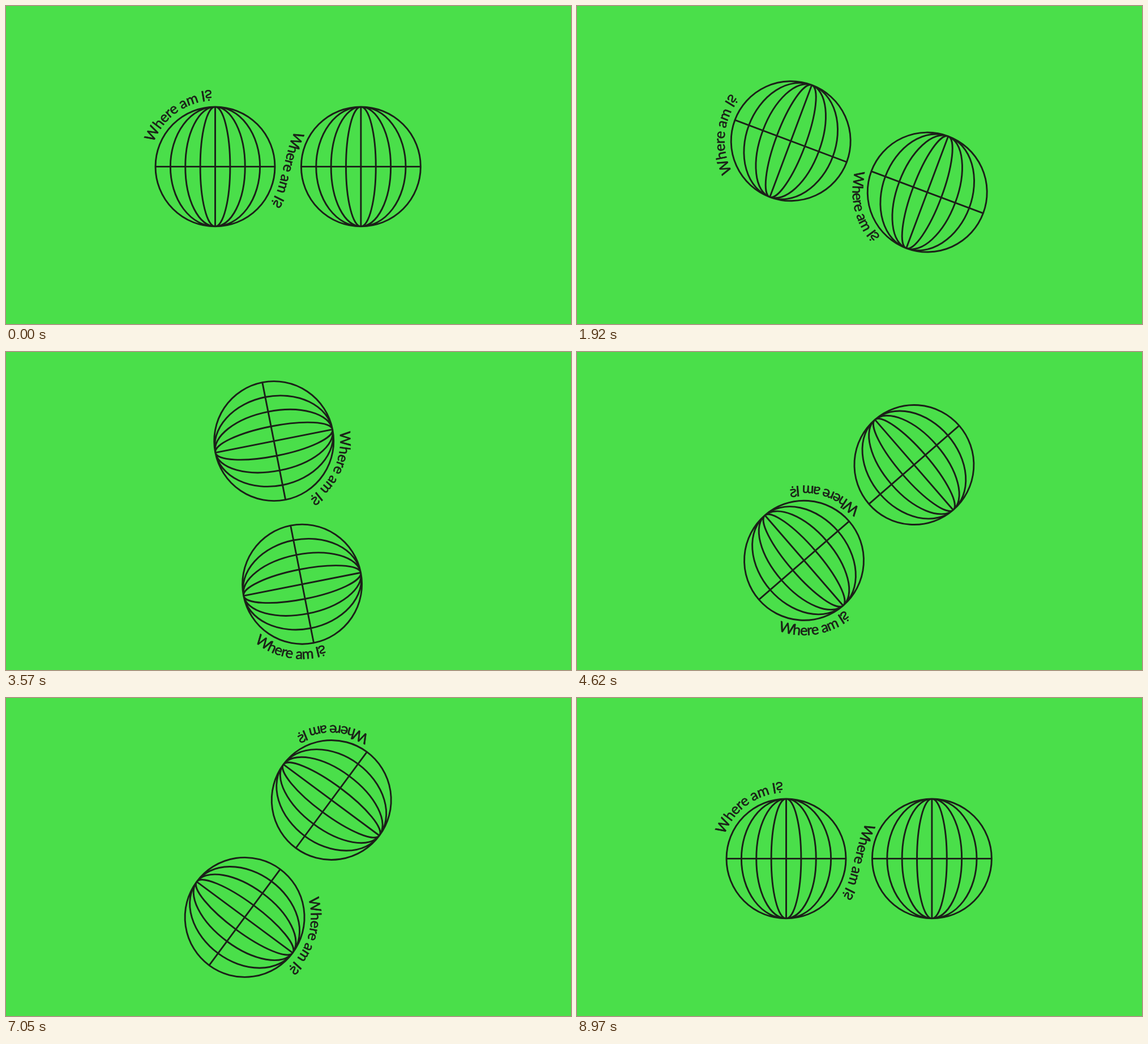
An HTML page with a canvas that plays this animation: 998 px wide and 561 px high, repeating every 9000 ms.

```html
<!DOCTYPE html>
<html lang="en">
<head>
<meta charset="utf-8">
<title>Where am I?</title>
<style>
  html, body { margin: 0; width: 100%; height: 100%; overflow: hidden; background: #4adf4a; }
  canvas { display: block; width: 998px; height: 561px; }
</style>
</head>
<body>
<canvas id="stage" width="998" height="561"></canvas>
<script>
const ctx = document.getElementById('stage').getContext('2d');
const GREEN = '#4adf4a', INK = '#1b2018';
const LOOP = 9000, STEP = 30, LAST = LOOP / STEP - 1;
const CENTER = { x: 498.2, y: 283.4 };
const D = 128.7;   // hub to globe centre
const R = 105.5;   // globe radius
const TEXT = 'Where am I?';
const FONT = '25.5px Lato, "Open Sans", sans-serif';
const TRACK = -0.6;
const STARTS = [5.3, 482.7];

// Figure-eight baseline: two arcs joined by crossing inner tangents.
const RL = 117, RR = 132;
const PHI = Math.acos((RL + RR) / (2 * D));
const TL = RL * Math.tan(PHI), TR = RR * Math.tan(PHI);
const SWEEP = 2 * (Math.PI - PHI);
const LEFT_END = TL + RL * SWEEP;
const RIGHT_START = LEFT_END + TL + TR;
const RIGHT_END = RIGHT_START + RR * SWEEP;
const TOTAL = RIGHT_END + TR;

function onLeft(a) {
  return { x: -D + RL * Math.cos(a), y: RL * Math.sin(a), dir: a + Math.PI / 2 };
}

function onRight(a) {
  return { x: D + RR * Math.cos(a), y: RR * Math.sin(a), dir: a - Math.PI / 2 };
}

function along(p, dist) {
  return { x: p.x + dist * Math.cos(p.dir), y: p.y + dist * Math.sin(p.dir), dir: p.dir };
}

function pathPoint(s) {
  s = ((s % TOTAL) + TOTAL) % TOTAL;
  if (s < TL) return along(onLeft(PHI), s - TL);
  if (s < LEFT_END) return onLeft(PHI + (s - TL) / RL);
  if (s < RIGHT_START) return along(onLeft(-PHI), s - LEFT_END);
  if (s < RIGHT_END) return onRight(Math.PI - PHI - (s - RIGHT_START) / RR);
  return along(onRight(PHI - Math.PI), s - RIGHT_END);
}

// Cubic-bezier easing with handles (0.55, 0) and (2/3, 1).
function ease(x) {
  let lo = 0, hi = 1;
  for (let i = 0; i < 40; i++) {
    const s = (lo + hi) / 2, q = 1 - s;
    if (3 * q * q * s * 0.55 + 2 * q * s * s + s * s * s < x) lo = s;
    else hi = s;
  }
  return lo * lo * (3 - 2 * lo);
}

// Glyph centres, measured from midway between the first and last glyph.
ctx.font = FONT;
const glyphs = [...TEXT].map((ch, i) => ({
  ch,
  pos: ctx.measureText(TEXT.slice(0, i + 1)).width - ctx.measureText(ch).width / 2 + i * TRACK
}));
const middle = (glyphs[0].pos + glyphs[glyphs.length - 1].pos) / 2;
glyphs.forEach(g => { g.pos -= middle; });

function drawGlobe(x) {
  ctx.lineWidth = 2.9;
  ctx.beginPath();
  for (let i = 1; i <= 4; i++) {
    ctx.moveTo(x + R * i / 4, 0);
    ctx.ellipse(x, 0, R * i / 4, R, 0, 0, Math.PI * 2);
  }
  ctx.moveTo(x - R, 0);
  ctx.lineTo(x + R, 0);
  ctx.moveTo(x, -R);
  ctx.lineTo(x, R);
  ctx.stroke();
}

// Question mark with a curled foot above its dot.
function drawQuery() {
  ctx.lineWidth = 2.5;
  ctx.beginPath();
  ctx.moveTo(-4.5, -15);
  ctx.bezierCurveTo(-3.5, -19, 4.5, -18.5, 4.5, -14);
  ctx.bezierCurveTo(4.5, -10, -4, -11, -4, -7.5);
  ctx.bezierCurveTo(-4, -5, 0, -5.2, 4, -5.6);
  ctx.stroke();
  ctx.beginPath();
  ctx.arc(0, -1, 1.6, 0, Math.PI * 2);
  ctx.fill();
}

function drawLetter(ch) {
  ctx.lineWidth = 0.6;
  ctx.fillText(ch, 0, 0);
  ctx.strokeText(ch, 0, 0);
}

function drawText(s) {
  for (const { ch, pos } of glyphs) {
    const p = pathPoint(s + pos);
    ctx.save();
    ctx.translate(p.x, p.y);
    ctx.rotate(p.dir);
    if (ch === '?') drawQuery();
    else drawLetter(ch);
    ctx.restore();
  }
}

function draw(time) {
  const k = Math.floor((time % LOOP) / STEP) / LAST;
  ctx.setTransform(1, 0, 0, 1, 0, 0);
  ctx.fillStyle = GREEN;
  ctx.fillRect(0, 0, 998, 561);
  ctx.translate(CENTER.x, CENTER.y);
  ctx.rotate(ease(k) * Math.PI * 2);
  ctx.fillStyle = ctx.strokeStyle = INK;
  ctx.font = FONT;
  ctx.textAlign = 'center';
  ctx.lineJoin = ctx.lineCap = 'round';
  drawGlobe(-D);
  drawGlobe(D);
  STARTS.forEach(s => drawText(s + k * TOTAL));
}

const start = performance.now();
function tick() {
  draw(performance.now() - start);
  requestAnimationFrame(tick);
}
tick();
</script>
</body>
</html>
```
